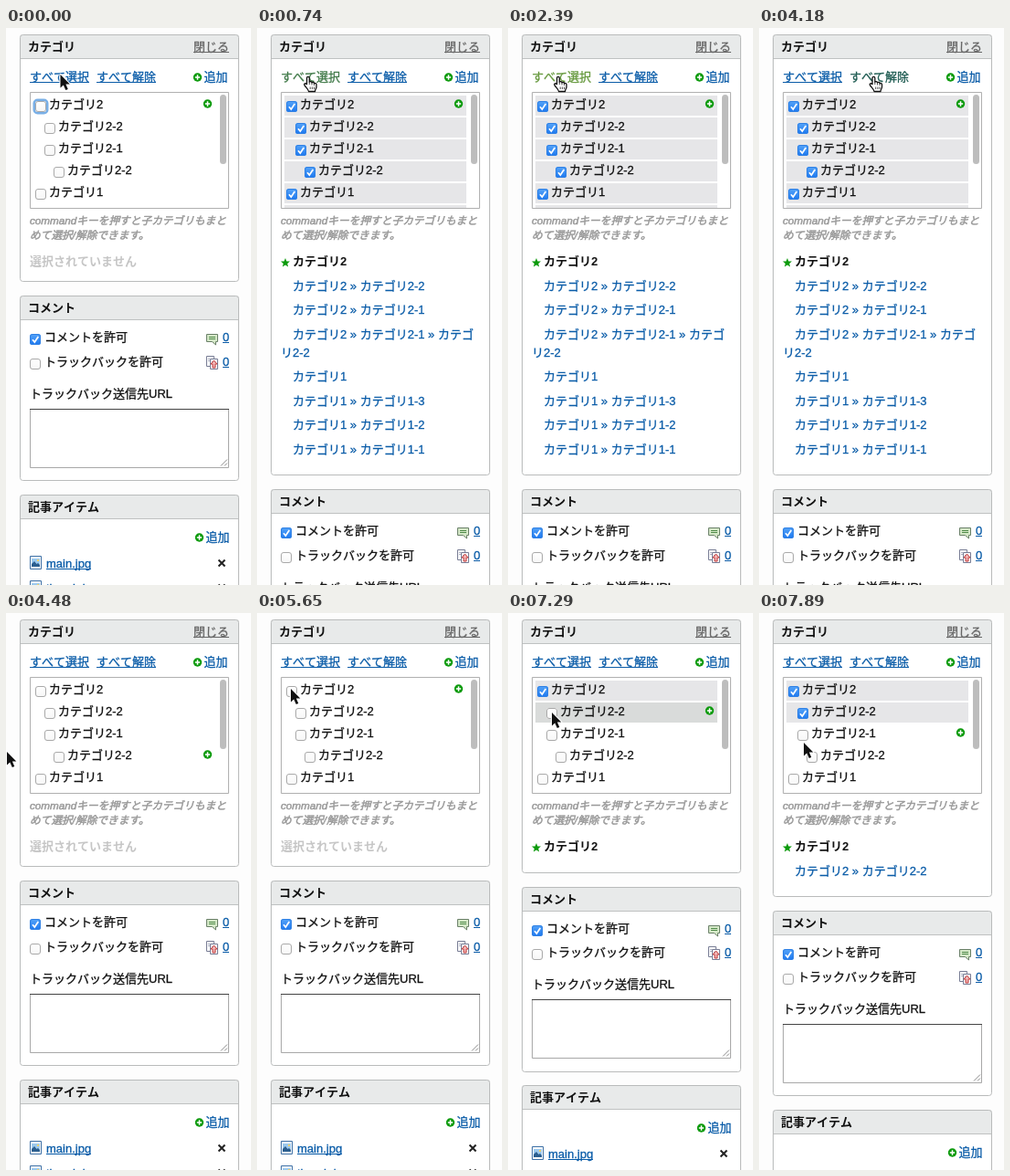
Write an HTML page with a canvas that moves like this. It is 268 by 610 pixels and loops after 8000 ms.

```html
<!DOCTYPE html>
<html lang="ja">
<head>
<meta charset="utf-8">
<title>カテゴリ</title>
<style>
html, body { margin: 0; width: 100%; height: 100%; overflow: hidden; background: #fff; }
canvas { display: block; width: 268px; height: 610px; }
</style>
</head>
<body>
<canvas id="stage" width="268" height="610"></canvas>
<script>
const ctx = document.getElementById('stage').getContext('2d');
const LOOP = 8000;
const FAMILY = '"Liberation Sans", "Noto Sans CJK JP", "Noto Sans CJK", sans-serif';
const NORMAL = `13px ${FAMILY}`;
const BOLD = `bold 13px ${FAMILY}`;
const HINT = `italic 11.7px ${FAMILY}`;
const BLUE = '#0a5ca8', DARK = '#1c5a50', GREEN = '#65983c', ADD = '#0c9a0c';

const rows = [
  { label: 'カテゴリ2', depth: 0 },
  { label: 'カテゴリ2-2', depth: 1 },
  { label: 'カテゴリ2-1', depth: 1 },
  { label: 'カテゴリ2-2', depth: 2 },
  { label: 'カテゴリ1', depth: 0 },
  { label: '', depth: 1 }
];
const paths = [
  ['カテゴリ2 » カテゴリ2-2'],
  ['カテゴリ2 » カテゴリ2-1'],
  ['カテゴリ2 » カテゴリ2-1 » カテゴ', 'リ2-2'],
  ['カテゴリ1'],
  ['カテゴリ1 » カテゴリ1-3'],
  ['カテゴリ1 » カテゴリ1-2'],
  ['カテゴリ1 » カテゴリ1-1']
];

// Each step overrides the state left by the one before it.
const steps = [
  [0, { cursor: 'arrow', x: 59.5, y: 51, plus: 0, ring: true, checked: 0, active: -1, all: null, none: null }],
  [450, { cursor: 'hand', x: 51, y: 53, all: DARK }],
  [600, { all: '#3f7947' }],
  [740, { checked: 6, ring: false }],
  [890, { all: GREEN }],
  [2390, { x: 50 }],
  [2980, { all: DARK }],
  [3130, { all: GREEN }],
  [3880, { cursor: 'arrow', x: 93, y: 53, all: null }],
  [4030, { cursor: 'hand', x: 117, y: 53, none: BLUE }],
  [4180, { x: 120.5, none: DARK }],
  [4330, { checked: 0, none: GREEN }],
  [4480, { cursor: 'arrow', x: 1, y: 152, plus: 3, none: null }],
  [4770, { x: 4, y: 150 }],
  [4920, { x: 13, y: 139, plus: 2 }],
  [5060, { x: 23, y: 122 }],
  [5210, { x: 30, y: 106, plus: 1 }],
  [5360, { x: 34, y: 94, plus: 0 }],
  [5500, { x: 36, y: 86 }],
  [5650, { x: 37, y: 83 }],
  [6700, { checked: 1 }],
  [7000, { x: 41, y: 92 }],
  [7150, { x: 47, y: 106, plus: 1 }],
  [7290, { x: 48, y: 109, active: 1 }],
  [7440, { checked: 2, active: -1 }],
  [7740, { x: 48.5, y: 127, plus: 2 }],
  [7890, { x: 49, y: 142 }]
];

const arrowPath = new Path2D('M0 0V14.4L3.3 11.4L5.8 17L8.3 15.9L5.9 10.5H10.3Z');
const handPath = new Path2D('M3.5 1.8C3.5 0 6.3 0 6.3 1.8V6.2C7 5.3 8.8 5.6 9 6.8C9.8 6 11.3 6.4 11.5 7.6C12.5 7 14 7.6 14 9V11.5C14 13.5 12.5 14 12.5 16.5H5.5C5.3 14.5 3 12.5 1.2 10C-.2 8.2 1.5 6.8 3.5 8.6Z');
const handLines = new Path2D('M6.3 6V9M9 7V9.5M11.5 8V10M7.2 11.5V14M9.4 11.5V14M11.5 11.5V14');
const starPath = new Path2D('M0 -5L1.4 -1.6L5 -1.4L2.2 .9L3.1 4.5L0 2.5L-3.1 4.5L-2.2 .9L-5 -1.4L-1.4 -1.6Z');

function rect(x, y, w, h, color) {
  ctx.fillStyle = color;
  ctx.fillRect(x, y, w, h);
}

function frame(x, y, w, h, color, radius = 0) {
  ctx.strokeStyle = color;
  ctx.lineWidth = 1;
  ctx.beginPath();
  ctx.roundRect(x + .5, y + .5, w - 1, h - 1, radius);
  ctx.stroke();
}

function stroke(path, color, width = 1) {
  ctx.strokeStyle = color;
  ctx.lineWidth = width;
  ctx.stroke(path);
}

function at(x, y, draw) {
  ctx.save();
  ctx.translate(x, y);
  draw();
  ctx.restore();
}

// y is the vertical middle of the line; weight thickens regular glyphs a little.
function text(str, x, y, color = '#111', font = NORMAL, weight = font === BOLD ? 0 : .3) {
  ctx.font = font;
  ctx.fillStyle = color;
  ctx.fillText(str, x, y + 5);
  if (!weight) return;
  ctx.strokeStyle = color;
  ctx.lineWidth = weight;
  ctx.strokeText(str, x, y + 5);
}

function link(str, x, y, color = BLUE) {
  text(str, x, y, color);
  rect(x, y + 6, Math.round(ctx.measureText(str).width), 1, color);
}

function plusIcon(x, y) {
  ctx.fillStyle = ADD;
  ctx.beginPath();
  ctx.arc(x, y, 4.7, 0, Math.PI * 2);
  ctx.fill();
  stroke(new Path2D(`M${x - 2.7} ${y}h5.4M${x} ${y - 2.7}v5.4`), '#fff', 1.5);
}

function addLink(x, y) {
  plusIcon(x, y + 1);
  text('追加', x + 7, y, BLUE);
}

function checkbox(x, y, on, ring) {
  if (ring) {
    ctx.fillStyle = '#79afe6';
    ctx.beginPath();
    ctx.roundRect(x - 2.5, y - 2.5, 17, 17, 5);
    ctx.fill();
  }
  const fill = ctx.createLinearGradient(0, y, 0, y + 12);
  fill.addColorStop(0, on ? '#57a5f8' : '#fff');
  fill.addColorStop(1, on ? '#1b77f0' : '#f6f6f6');
  ctx.fillStyle = fill;
  ctx.beginPath();
  ctx.roundRect(x, y, 12, 12, 2.5);
  ctx.fill();
  frame(x, y, 12, 12, on ? '#2f80e4' : '#a9a9a9', 2.5);
  if (on) stroke(new Path2D(`M${x + 3} ${y + 6.2}l2.3 2.8l4 -6`), '#fff', 1.7);
}

function panel(y, height, title) {
  ctx.fillStyle = '#fff';
  ctx.beginPath();
  ctx.roundRect(15, y, 240, height, 3);
  ctx.fill();
  ctx.fillStyle = '#e8eaea';
  ctx.beginPath();
  ctx.roundRect(15, y, 240, 27, [3, 3, 0, 0]);
  ctx.fill();
  rect(15, y + 26, 240, 1, '#bfc1c1');
  frame(15, y, 240, height, '#b9bbbb', 3);
  text(title, 24, y + 13, '#111', BOLD);
}

function drawList(s) {
  rect(26, 70, 218, 128, '#fff');
  ctx.save();
  ctx.beginPath();
  ctx.rect(27, 71, 216, 126);
  ctx.clip();
  rows.forEach((row, i) => {
    const top = 74 + i * 24, x = 32 + row.depth * 10;
    const on = i < s.checked;
    if (on || i === s.active) rect(30, top, 199, 22, on ? '#e6e6e8' : '#d9dbda');
    if (!row.label) return;
    checkbox(x, top + 6, on, s.ring && i === 0);
    text(row.label, x + 15, top + 9);
    if (i === s.plus) plusIcon(220.5, top + 9);
  });
  ctx.fillStyle = '#bdbdbd';
  ctx.beginPath();
  ctx.roundRect(234, 73, 7, 76, 3.5);
  ctx.fill();
  ctx.restore();
  frame(26, 70, 218, 128, '#b0b0b0');
}

// Draws the chosen categories and returns how far the panel grows.
function drawSelection(count) {
  const top = 255;
  if (!count) {
    text('選択されていません', 26, top, '#c6c6c6', BOLD);
    return 0;
  }
  at(31, top + 2, () => { ctx.fillStyle = ADD; ctx.fill(starPath); });
  text('カテゴリ2', 39, top, '#111', BOLD);
  const shown = count === 6 ? paths : paths.slice(0, count - 1);
  let y = top;
  for (const [first, rest] of shown) {
    y += 26.5;
    text(first, 39, Math.round(y), BLUE);
    if (rest) text(rest, 26, Math.round(y += 20), BLUE);
  }
  return y - top + 6.5;
}

function commentIcon(y) {
  at(219, y, () => {
    const bubble = new Path2D('M.5 .5H12.5V8.5H10.5V12L6.5 8.5H.5Z');
    ctx.fillStyle = '#d5e8c8';
    ctx.fill(bubble);
    stroke(bubble, '#6a8068');
    stroke(new Path2D('M3 3.5H10M3 5.5H10'), '#4f8a48');
  });
}

function trackbackIcon(y) {
  at(219, y, () => {
    for (const [x, top] of [[0, 0], [4, 3]]) {
      rect(x, top, 9, 12, '#fff');
      frame(x, top, 9, 12, '#777c94');
      stroke(new Path2D(`M${x + 2} ${top + 3.5}h4M${x + 2} ${top + 5.5}h4`), '#a9aec0');
    }
    const arrow = new Path2D('M8.5 5L12 9H10V13H7V9H5Z');
    ctx.fillStyle = '#f0b4b4';
    ctx.fill(arrow);
    stroke(arrow, '#c23a3a');
  });
}

function drawComments(shift) {
  const place = y => Math.round(y + shift);
  panel(place(293), 203, 'コメント');
  let y = place(339);
  checkbox(26, y - 4, true);
  text('コメントを許可', 42, y - 1);
  commentIcon(y - 4);
  link('0', 237, y - 1);
  y = place(365.6);
  checkbox(26, y - 4, false);
  text('トラックバックを許可', 42, y - 1);
  trackbackIcon(y - 7);
  link('0', 237, y - 1);
  text('トラックバック送信先URL', 26, place(399.6));
  y = place(416.6);
  rect(26, y, 218, 65, '#fff');
  frame(26, y, 218, 65, '#a8a8a8');
  rect(26, y, 218, 1, '#444');
  stroke(new Path2D(`M235 ${y + 62.5}l7 -7M239 ${y + 62.5}l3 -3`), '#888');
}

function fileRow(name, y) {
  at(26, y - 8, () => {
    rect(0, 0, 13, 15, '#fff');
    frame(0, 0, 13, 15, '#3c6fa5');
    rect(2, 3, 9, 9, '#9cc9ee');
    ctx.fillStyle = '#2c5f8f';
    ctx.fill(new Path2D('M2 12V9L5 6L7.5 9L9 8L11 10V12Z'));
    rect(8, 4, 2, 2, '#f3d36b');
  });
  link(name, 44, y);
  stroke(new Path2D(`M232.5 ${y - 3.5}l7 7m0 -7l-7 7`), '#222', 2);
}

function drawItems(shift) {
  const y = Math.round(510.5 + shift);
  panel(y, 200, '記事アイテム');
  addLink(211.5, y + 46);
  fileRow('main.jpg', y + 75);
  fileRow('thumb.jpg', y + 102);
}

function drawCursor({ cursor, x, y }) {
  at(x, y, () => {
    ctx.lineJoin = 'round';
    if (cursor === 'arrow') {
      stroke(arrowPath, '#fff', 2.2);
      ctx.fillStyle = '#111';
      ctx.fill(arrowPath);
    } else {
      ctx.fillStyle = '#fff';
      ctx.fill(handPath);
      stroke(handPath, '#111', 1.3);
      stroke(handLines, '#222', .8);
    }
  });
}

function toolLink(str, x, hover) {
  if (hover) text(str, x, 53, hover);
  else link(str, x, 53);
}

function stateAt(time) {
  return Object.assign({}, ...steps.filter(([t]) => t <= time).map(step => step[1]));
}

function draw(time) {
  const s = stateAt(time);
  ctx.lineJoin = 'miter';
  rect(0, 0, 268, 610, '#fdfdfd');
  const growth = s.checked === 0 ? 0 : s.checked === 6 ? 212 : 6.5 + (s.checked - 1) * 26.5;
  panel(7, Math.round(271 + growth), 'カテゴリ');
  link('閉じる', 205, 20, '#666');
  toolLink('すべて選択', 26, s.all);
  toolLink('すべて解除', 99, s.none);
  addLink(209.5, 53);
  drawList(s);
  text('commandキーを押すと子カテゴリもまと', 26, 210, '#999', HINT, .5);
  text('めて選択/解除できます。', 26, 226, '#999', HINT, .5);
  const shift = drawSelection(s.checked);
  drawComments(shift);
  drawItems(shift);
  drawCursor(s);
}

const start = performance.now();
function tick() {
  draw((performance.now() - start) % LOOP);
  requestAnimationFrame(tick);
}
tick();
</script>
</body>
</html>
```
